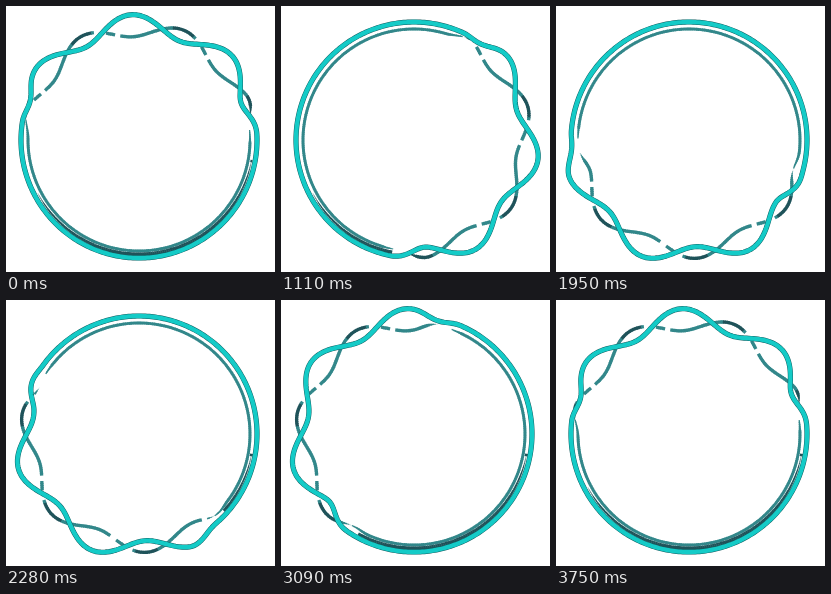
Animation, 269 px wide and 266 px high, one loop 3.78 s. Source, as an HTML page with a canvas:

```html
<!DOCTYPE html>
<html lang="en">
<head>
<meta charset="utf-8">
<title>Twisting ring</title>
<style>
  html, body { margin: 0; width: 100%; height: 100%; overflow: hidden; background: #fff; }
  canvas { display: block; }
</style>
</head>
<body>
<canvas id="stage" width="269" height="266"></canvas>
<script>
const ctx = document.getElementById('stage').getContext('2d');
const CX = 133, CY = 134, LOOP = 3780, STEP = 30;
const LOBES = 7, CREST = -93.5;
const BRIGHT = '#14cbc7', EDGE = '#125c5f', BACK = '#32878a', SHADE = '#1f535a';
const RAD = Math.PI / 180;

const mod = (a, n) => ((a % n) + n) % n;
const ramp = (a, b, x) => {
  const k = Math.min(1, Math.max(0, (x - a) / (b - a)));
  return k * k * (3 - 2 * k);
};
// 0 at a crest, 0.5 at a trough
const phaseAt = deg => mod((deg - CREST) * LOBES / 360, 1);
// Angle behind the leading end of the twist, 0..360
const lagAt = (deg, turn) => mod(turn - deg, 360);
const wave = deg => Math.cos(phaseAt(deg) * 2 * Math.PI);

function point(radius, deg) {
  return [CX + radius * Math.cos(deg * RAD), CY + radius * Math.sin(deg * RAD)];
}

function frontRadius(deg, turn) {
  const lag = lagAt(deg, turn);
  const twist = ramp(1, 24, lag) * (1 - ramp(150, 171, lag));
  return 118 + twist * (9.3 * wave(deg) - 1.8);
}

function backRadius(deg, turn) {
  const lag = lagAt(deg, turn);
  const twist = ramp(3, 24, lag) * (1 - ramp(160, 180, lag));
  return 111 - 7.6 * twist * wave(deg);
}

function backWidth(deg, lag) {
  const p = phaseAt(deg);
  if (lag > 13 && lag < 170) {
    const hidden = (p > 0.8 && p < 0.86) || (p > 0.62 && p < 0.72);
    const end = Math.min(1, (lag - 13) / 5, (170 - lag) / 6);
    return hidden ? 0 : 3.3 * end;
  }
  const outside = lag <= 13 ? 5 - lag : lag - 171;
  return outside < 0 ? 0 : 2.9 * Math.min(1, 0.4 + outside / 14);
}

function drawBack(turn) {
  ctx.lineCap = 'butt';
  for (let d = 0; d < 360; d++) {
    const lag = lagAt(d, turn), width = backWidth(d, lag), p = phaseAt(d);
    if (!width) continue;
    const twisted = lag > 13 && lag < 170;
    ctx.strokeStyle = twisted && p > 0.38 && p < 0.6 ? SHADE : BACK;
    ctx.lineWidth = width;
    ctx.beginPath();
    ctx.moveTo(...point(backRadius(d - 0.2, turn), d - 0.2));
    ctx.lineTo(...point(backRadius(d + 1.2, turn), d + 1.2));
    ctx.stroke();
  }
}

// Crescent along the bottom, where the strands run side by side
function drawShadow(turn) {
  ctx.strokeStyle = SHADE;
  for (let d = 10; d < 152; d++) {
    const lag = lagAt(d, turn);
    if (lag > 5 && lag < 176) continue;
    ctx.lineWidth = 3.6 * Math.sin((d - 10) / 142 * Math.PI) ** 0.6;
    ctx.beginPath();
    ctx.arc(CX, CY, 114.3, d * RAD, (d + 1.2) * RAD);
    ctx.stroke();
  }
}

function drawFront(turn) {
  ctx.beginPath();
  for (let d = 0; d < 360; d++) ctx.lineTo(...point(frontRadius(d, turn), d));
  ctx.closePath();
  ctx.lineJoin = 'round';
  ctx.strokeStyle = EDGE;
  ctx.lineWidth = 5.2;
  ctx.stroke();
  ctx.strokeStyle = BRIGHT;
  ctx.lineWidth = 4.3;
  ctx.stroke();
}

function draw(ms) {
  const turn = Math.floor(ms % LOOP / STEP) * STEP / LOOP * 360;
  ctx.fillStyle = '#fff';
  ctx.fillRect(0, 0, 269, 266);
  drawBack(turn);
  drawShadow(turn);
  drawFront(turn);
}

const start = performance.now();
function tick() {
  draw(performance.now() - start);
  requestAnimationFrame(tick);
}
tick();
</script>
</body>
</html>
```
